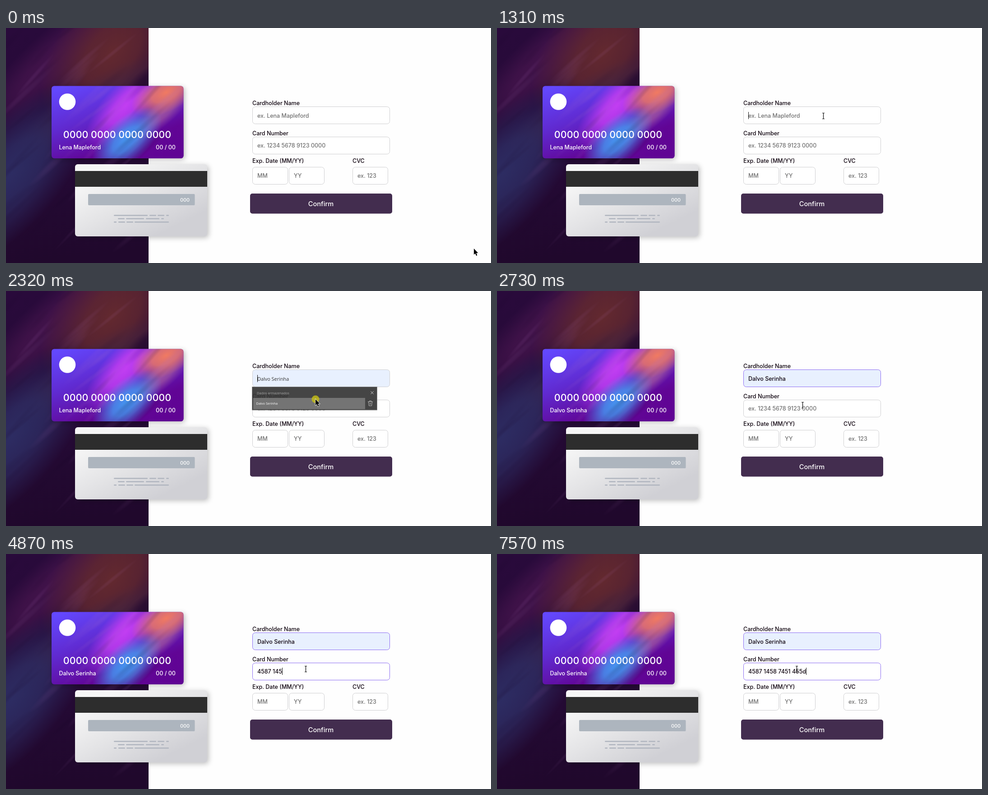
Recreate the animation shown at these times as an HTML page with a canvas. Size 1075 by 521 pixels, loop 8000 ms.

```html
<!DOCTYPE html>
<html lang="en">
<head>
<meta charset="utf-8">
<title>Card form</title>
<style>
  html, body { margin: 0; width: 1075px; height: 521px; overflow: hidden; background: #fefefe; }
  canvas { display: block; }
</style>
</head>
<body>
<canvas id="stage" width="1075" height="521"></canvas>
<script>
const W = 1075, H = 521, LOOP = 8000;
const UI = 'Inter, sans-serif', SYSTEM = '"Open Sans", sans-serif';
const SAMPLE_NAME = 'Lena Mapleford', OWNER = 'Dalvo Serinha';
const DIGITS = '4587 1458 7451 455d';
const SIZE = 12.5, OPEN = 1570, FILLED = 2660, FOCUS_NUMBER = 3660;

const stage = document.getElementById('stage').getContext('2d');
let ctx = stage;

function text(str, x, y, size, color, weight = 500, align = 'left', family = UI) {
  ctx.font = `${weight} ${size}px ${family}`;
  ctx.textAlign = align;
  ctx.fillStyle = color;
  ctx.fillText(str, x, y);
}

function box(x, y, w, h, r, fill, stroke) {
  ctx.beginPath();
  ctx.roundRect(x, y, w, h, r);
  if (fill) { ctx.fillStyle = fill; ctx.fill(); }
  if (stroke) { ctx.strokeStyle = stroke; ctx.lineWidth = 1; ctx.stroke(); }
}

function disc(x, y, r, color) {
  ctx.beginPath();
  ctx.arc(x, y, r, 0, 7);
  ctx.fillStyle = color;
  ctx.fill();
}

function line(color, width, ...points) {
  ctx.beginPath();
  points.forEach(([x, y], i) => i ? ctx.lineTo(x, y) : ctx.moveTo(x, y));
  ctx.strokeStyle = color;
  ctx.lineWidth = width;
  ctx.stroke();
}

function ramp(x0, y0, x1, y1, ...colors) {
  const g = ctx.createLinearGradient(x0, y0, x1, y1);
  colors.forEach((c, i) => g.addColorStop(i / (colors.length - 1), c));
  return g;
}

// Soft tilted ellipse of colour
function glow(x, y, rx, ry, degrees, color, alpha) {
  ctx.save();
  ctx.translate(x, y);
  ctx.rotate(degrees * Math.PI / 180);
  ctx.scale(rx, ry);
  ctx.globalAlpha = alpha;
  const g = ctx.createRadialGradient(0, 0, 0, 0, 0, 1);
  g.addColorStop(0, color);
  g.addColorStop(0.4, color + 'd0');
  g.addColorStop(0.75, color + '50');
  g.addColorStop(1, color + '00');
  disc(0, 0, 1, g);
  ctx.restore();
}

// Faint diagonal brush marks
function brush(x, y, w, h, count, seed) {
  const rnd = () => (seed = seed * 16807 % 2147483647) / 2147483647;
  for (let i = 0; i < count; i++) {
    const light = rnd() < 0.5;
    const cx = x + rnd() * w, cy = y + rnd() * h;
    glow(cx, cy, 40 + rnd() * 70, 4 + rnd() * 7, -36 - rnd() * 14, light ? '#b070c0' : '#180428', 0.1);
  }
}

function paintBackdrop() {
  ctx.save();
  ctx.beginPath();
  ctx.rect(0, 0, 316, H);
  ctx.clip();
  ctx.fillStyle = ramp(0, 0, 60, H, '#290a3b', '#260a38', '#20082c');
  ctx.fillRect(0, 0, 316, H);
  glow(110, 70, 250, 65, -42, '#4b1650', 0.75);
  glow(235, 55, 200, 120, -50, '#63292f', 1);
  glow(190, 175, 210, 55, -32, '#46263f', 0.8);
  glow(12, 325, 250, 110, -50, '#2d2c62', 1);
  glow(318, 115, 80, 28, -35, '#22082f', 0.8);
  brush(0, 0, 316, 460, 36, 71);
  ctx.restore();
}

function cardBase(x, y, w, h, fill) {
  ctx.save();
  ctx.shadowColor = 'rgba(0,0,0,.25)';
  ctx.shadowBlur = 12;
  ctx.shadowOffsetX = 3;
  ctx.shadowOffsetY = 3;
  box(x, y, w, h, 6, fill);
  ctx.restore();
}

function paintFront() {
  cardBase(101, 128.5, 292.5, 160.5, ramp(130, 128, 190, 289, '#6348fe', '#602ad0', '#610596'));
  ctx.save();
  ctx.clip();
  glow(400, 285, 170, 90, -35, '#600494', 1);
  glow(265, 172, 125, 48, -48, '#c23df2', 1);
  glow(345, 188, 90, 28, -40, '#a3589f', 0.85);
  glow(355, 143, 85, 42, -28, '#f07a62', 1);
  glow(268, 248, 95, 48, -42, '#4597f2', 1);
  brush(190, 128, 200, 160, 18, 23);
  ctx.restore();
  disc(136, 163.5, 18.3, '#fff');
  text('0000 0000 0000 0000', 246.5, 243.5, 21.5, '#fff', 500, 'center');
  text('00 / 00', 376, 269, 12.6, '#fff', 500, 'right');
}

function paintBack() {
  cardBase(153, 302, 293, 160, ramp(250, 302, 330, 462, '#f6f6f6', '#e4e4e6', '#d0d0d5'));
  ctx.fillStyle = '#2d2d2d';
  ctx.fillRect(153, 317, 293, 35);
  box(182, 368, 236.5, 25, 2, '#adb5be');
  text('000', 407, 385, 10.8, '#fff', 500, 'right');
  const dashes = [
    [415.5, 239, 314, 318, 333, 336, 351, 355, 361],
    [422.8, 248, 263, 266, 306, 310, 340, 344, 350],
    [430.2, 239, 245, 249, 264, 267, 282, 285, 361]
  ];
  for (const [y, ...ends] of dashes)
    for (let i = 0; i < ends.length; i += 2)
      box(ends[i], y - 1.2, ends[i + 1] - ends[i], 2.4, 1.2, '#b0b5bf');
}

function field(x, y, w, border = '#cfcfd1', fill = '#fff') {
  box(x + 0.5, y + 0.5, w, 38, 6, fill, border);
}

function paintForm() {
  const label = (s, x, y) => text(s, x, y, SIZE, '#100510');
  const hint = (s, x) => text(s, x, 331.5, SIZE, '#707070');
  label('Cardholder Name', 546, 171);
  label('Card Number', 546, 238);
  label('Exp. Date (MM/YY)', 546, 299);
  label('CVC', 768, 299);
  field(546, 308, 78);
  field(627, 308, 78);
  field(768, 308, 78);
  hint('MM', 557);
  hint('YY', 638);
  hint('ex. 123', 779);
  box(541, 367, 315, 44.5, 5, '#432d4f');
  text('Confirm', 698, 394.5, 14.6, '#fff', 500, 'center');
}

function buildScene() {
  const scene = document.createElement('canvas');
  scene.width = W;
  scene.height = H;
  ctx = scene.getContext('2d');
  ctx.fillStyle = '#fefefe';
  ctx.fillRect(0, 0, W, H);
  paintBackdrop();
  paintFront();
  paintBack();
  paintForm();
  ctx = stage;
  return scene;
}

// Pointer legs: start, end, number of steps, destination
const LEGS = [
  [70, 830, 12, 762, 220],
  [890, 1240, 6, 723, 195],
  [1790, 2130, 6, 690, 234],
  [2190, 2320, 3, 686, 240],
  [2390, 2590, 4, 681, 252],
  [2660, 2990, 6, 664, 255]
];
// Clicks: press, release
const CLICKS = [[1240, 1310], [2320, 2390], [3660, 3725]];
// Typing: time, characters shown
const KEYS = [
  [3725, 1], [3790, 2], [4070, 3], [4140, 4], [4600, 7], [4870, 8], [5260, 9], [5460, 11],
  [6010, 12], [6100, 13], [6430, 14], [6500, 16], [6910, 17], [7110, 18], [7570, 19]
];

function pointerAt(t) {
  let x = 1037, y = 489;
  for (const [t0, t1, steps, tx, ty] of LEGS) {
    if (t < t0) break;
    const step = Math.floor((t - t0) / (t1 - t0) * (steps - 1) + 0.001) + 1;
    const u = Math.min(1, step / steps), k = u * u * (3 - 2 * u);
    x += (tx - x) * k;
    y += (ty - y) * k;
  }
  return { x, y };
}

function caret(x, y) {
  ctx.fillStyle = '#111';
  ctx.fillRect(Math.round(x), y, 1, 16);
}

function drawName(t, hover) {
  const filled = t >= FILLED;
  field(546, 174, 304, filled ? '#8c6cf2' : undefined, filled || hover ? '#e8f0fe' : undefined);
  if (filled) text(OWNER, 557, 199, SIZE, '#100510');
  else if (hover) text(OWNER, 557, 198.5, 10.9, '#333', 400, 'left', SYSTEM);
  else text('ex. ' + SAMPLE_NAME, 557, 199, SIZE, '#707070');
  if (t >= 1240 && t < 1790 || t >= 2315 && !filled) caret(557, 186);
  text(filled ? OWNER : SAMPLE_NAME, 117.5, 269, 12.4, '#fff');
}

function drawNumber(t) {
  const focused = t >= FOCUS_NUMBER;
  const last = KEYS.filter(([at]) => t >= at).pop();
  const typed = DIGITS.slice(0, last ? last[1] : 0);
  field(546, 241, 304, focused ? '#8c6cf2' : undefined);
  if (typed) text(typed, 557, 265, SIZE, '#100510');
  else text('ex. 1234 5678 9123 0000', 557, 265, SIZE, '#707070');
  if (focused) caret(557 + (typed && ctx.measureText(typed).width), 252);
}

function drawSuggestions(hover) {
  box(545.5, 212.5, 277, 51.5, 0, 'rgba(55,55,55,.93)', '#8d8d8d');
  text('Dados armazenados', 556, 228.5, 7.5, '#a5a5a5', 400, 'left', SYSTEM);
  line('#e0e0e0', 1, [808.5, 222.5], [814.5, 228.5]);
  line('#e0e0e0', 1, [814.5, 222.5], [808.5, 228.5]);
  if (hover) {
    box(548, 237, 248, 25, 0, '#747474');
    line('#b5b5b5', 1, [802, 245.5], [813, 245.5]);
    line('#b5b5b5', 1, [805.5, 245], [805.5, 243.5], [809.5, 243.5], [809.5, 245]);
    line('#b5b5b5', 1, [803.5, 246], [804.5, 254.5], [810.5, 254.5], [811.5, 246]);
    line('#b5b5b5', 0.8, [806.5, 248], [806.5, 252]);
    line('#b5b5b5', 0.8, [808.5, 248], [808.5, 252]);
  }
  text(OWNER, 554.5, 251.5, 7.4, '#fff', 400, 'left', SYSTEM);
}

function drawPointer({ x, y }, beam) {
  ctx.save();
  ctx.translate(Math.round(x), Math.round(y));
  if (beam) {
    ctx.translate(0.5, 0);
    line('#111', 1.3, [0, -6.5], [0, 6.5]);
    for (const end of [-6.5, 6.5]) line('#111', 1, [-2.5, end], [2.5, end]);
  } else {
    ctx.beginPath();
    for (const [px, py] of [[0, 0], [0, 13.5], [3, 10.8], [5.3, 16], [7.5, 15], [5.3, 10], [9.3, 9.8]])
      ctx.lineTo(px, py);
    ctx.closePath();
    ctx.strokeStyle = '#fff';
    ctx.lineWidth = 1.4;
    ctx.stroke();
    ctx.fillStyle = '#000';
    ctx.fill();
  }
  ctx.restore();
}

function draw(t) {
  const pointer = pointerAt(t);
  const open = t >= OPEN && t < FILLED;
  const hover = open && pointer.y >= 237;
  const overField = pointer.x > 546 && pointer.x < 851 &&
    (pointer.y > 174 && pointer.y < 213 || !open && pointer.y > 241 && pointer.y < 280);

  ctx.drawImage(scene, 0, 0);
  drawName(t, hover);
  drawNumber(t);
  if (open) drawSuggestions(hover);
  if (t >= 3460 && t < FOCUS_NUMBER) {
    box(672, 265.5, 90, 15.5, 0, '#3b3b3b');
    text('Preencha este campo.', 717, 276, 7.6, '#e8e8e8', 400, 'center', SYSTEM);
  }
  if (CLICKS.some(([down, up]) => t >= down && t < up))
    disc(pointer.x, pointer.y, 8.5, 'rgba(200,192,20,.8)');
  drawPointer(pointer, overField);
}

const scene = buildScene();
const start = performance.now();
function tick() {
  draw((performance.now() - start) % LOOP);
  requestAnimationFrame(tick);
}
tick();
</script>
</body>
</html>
```
